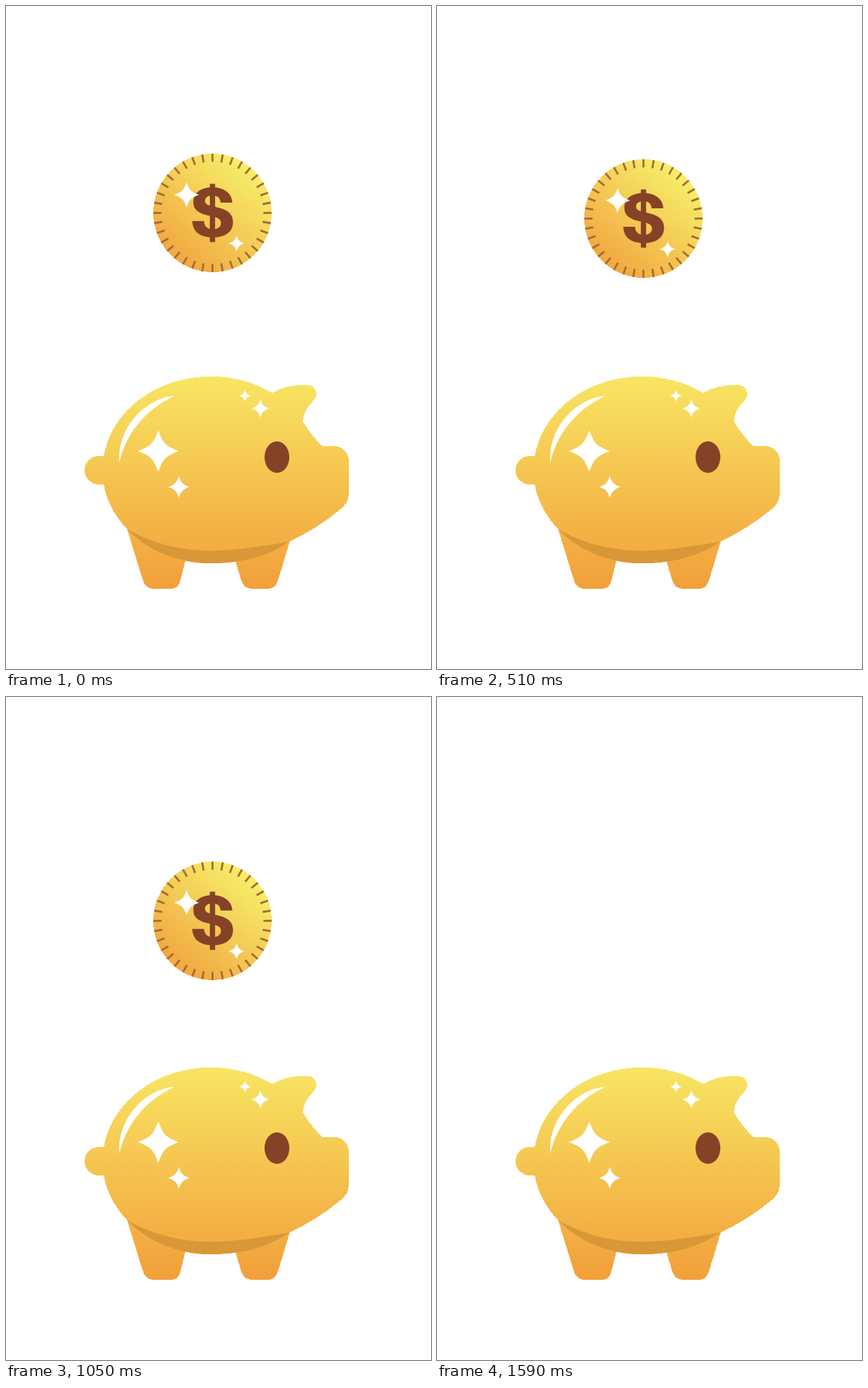
An HTML page that plays this animation: 600x934 px, repeating every 2700 ms.

```html
<!DOCTYPE html>
<html lang="en">
<head>
<meta charset="utf-8">
<title>Piggy bank</title>
<style>
  html, body { margin: 0; width: 100%; height: 100%; overflow: hidden; background: #fff; }
  svg { display: block; width: 100vw; height: 100vh; }
  .edge { shape-rendering: crispEdges; }
</style>
</head>
<body>
<svg viewBox="0 0 600 934">
  <defs>
    <linearGradient id="skin" gradientUnits="userSpaceOnUse" x1="0" y1="522" x2="0" y2="821">
      <stop offset="0" stop-color="#f8e563"/>
      <stop offset="1" stop-color="#f29f3a"/>
    </linearGradient>
    <linearGradient id="gold" gradientUnits="userSpaceOnUse" x1="50" y1="-60" x2="-50" y2="60">
      <stop offset="0" stop-color="#f6ed69"/>
      <stop offset="1" stop-color="#f2a941"/>
    </linearGradient>
    <path id="star" d="M0-1C.25-.35 .35-.25 1 0C.35 .25 .25 .35 0 1C-.25 .35-.35 .25-1 0C-.35-.25-.25-.35 0-1Z" fill="#fff"/>
  </defs>

  <g id="coin">
    <circle class="edge" r="83.5" fill="url(#gold)"/>
    <g id="ticks" stroke="#a66c36" stroke-width="2.8"></g>
    <g fill="#864227">
      <path d="M28-14.5C27.5-28 16-36 0-36C-17-36-27-28-27-15.5C-27-3-18 1-4 4C6 6 12 8 12 14C12 20 7 23 0 23C-7 23-11.5 19-12 11.5H-28.5C-28 26-18 34.5 0 34.5C18 34.5 29 27 29 13C29 0 20-5 4-8.5C-6-10.5-10.5-12-10.5-17C-10.5-22-6-24.5 0-24.5C7-24.5 11-21 11.5-14.5Z"/>
      <rect x="-3.7" y="-41" width="7.4" height="82"/>
    </g>
  </g>

  <g id="pig">
    <g class="edge" fill="url(#skin)">
      <path d="M171 737L193 808Q197 821 209 821H232Q243 821 246 810L254 778Z"/>
      <path d="M323 778L332 809Q336 821 347 821H370Q380 821 384 809L401 753Z"/>
      <path d="M138 634A152 131.5 0 0 1 289 522A152 131.5 0 0 1 375.5 545C391 536 408 533.5 426 534C434 534 438 541 438 547Q438 552 433 557C425 565 420 573 419 585C427 599 437 611 447 620H463A21 21 0 0 1 484 641V686C484 697 479 703 472 709C452 726 425 743 400 754.5C370 775 335 785 289 785A152 131.5 0 0 1 171 737A152 131.5 0 0 1 138 674H131A20 20 0 0 1 131 634Z"/>
    </g>
    <path d="M171 737C205 757 245 767 288 767.5C330 767 367 760 400 754.5C370 775 335 785 289 785A152 131.5 0 0 1 171 737Z" fill="#d99838"/>
    <path d="M238 549C200 552 157 590 160 643C169 604 195 569 238 549Z" fill="#fff"/>
    <ellipse cx="382.5" cy="635.5" rx="17.5" ry="22.3" fill="#864227"/>
  </g>
</svg>
<script>
const LOOP = 2700, STEP = 30;
const coin = document.getElementById('coin');
const pig = document.getElementById('pig');

function add(parent, tag, attrs) {
  const node = document.createElementNS('http://www.w3.org/2000/svg', tag);
  for (const key in attrs) node.setAttribute(key, attrs[key]);
  parent.appendChild(node);
}

function addStar(parent, x, y, r) {
  add(parent, 'use', { href: '#star', transform: `translate(${x} ${y}) scale(${r})` });
}

for (let a = 0; a < 360; a += 10) {
  add(document.getElementById('ticks'), 'line', { y1: -83.5, y2: -72, transform: `rotate(${a})` });
}
addStar(coin, -36.5, -25.5, 17.5);
addStar(coin, 34, 43, 11);
addStar(pig, 215, 627, 29);
addStar(pig, 244, 677.5, 15);
addStar(pig, 359, 567, 12.5);
addStar(pig, 337.5, 549, 8);

const cubic = (u, a, b) => 3 * (1 - u) * (1 - u) * u * a + 3 * (1 - u) * u * u * b + u * u * u;

// Easing curve through two handles, solved by bisection.
function bezier(x1, y1, x2, y2) {
  return x => {
    let lo = 0, hi = 1;
    for (let i = 0; i < 24; i++) {
      const mid = (lo + hi) / 2;
      if (cubic(mid, x1, x2) < x) lo = mid; else hi = mid;
    }
    return cubic(lo, y1, y2);
  };
}

const swing = bezier(0.42, 0, 0.58, 1);
const moves = [
  { start: 45, end: 310, from: 0, to: 18, ease: swing },
  { start: 310, end: 690, from: 18, to: -3.5, ease: bezier(0.5, 0, 0.62, 1) },
  { start: 690, end: 1320, from: -3.5, to: 306, ease: bezier(0.75, 0, 0.8, 0.18) }
];

function coinOffset(t) {
  const m = moves.find(m => t < m.end) || moves[2];
  const x = Math.min(1, Math.max(0, (t - m.start) / (m.end - m.start)));
  return m.from + (m.to - m.from) * m.ease(x);
}

// Jolt after the coin lands: time, dx, dy.
const jolt = [
  [1230, 0, 0], [1290, -6, 2.5], [1350, 3.7, -4.5], [1410, -4, 2],
  [1470, 2, -2], [1530, -1, 1], [1590, 0, 0]
];

function pigOffset(t) {
  const i = jolt.findIndex(k => t < k[0]);
  if (i < 1) return [0, 0];
  const [t0, x0, y0] = jolt[i - 1], [t1, x1, y1] = jolt[i];
  const p = swing((t - t0) / (t1 - t0));
  return [x0 + (x1 - x0) * p, y0 + (y1 - y0) * p];
}

function draw(now) {
  const t = Math.floor((now % LOOP) / STEP) * STEP;
  coin.setAttribute('transform', `translate(291.5 ${291.5 + coinOffset(t)})`);
  coin.setAttribute('visibility', t < 1320 ? 'visible' : 'hidden');
  pig.setAttribute('transform', `translate(${pigOffset(t)})`);
}

const begin = performance.now();
function tick() {
  draw(performance.now() - begin);
  requestAnimationFrame(tick);
}
tick();
</script>
</body>
</html>
```
